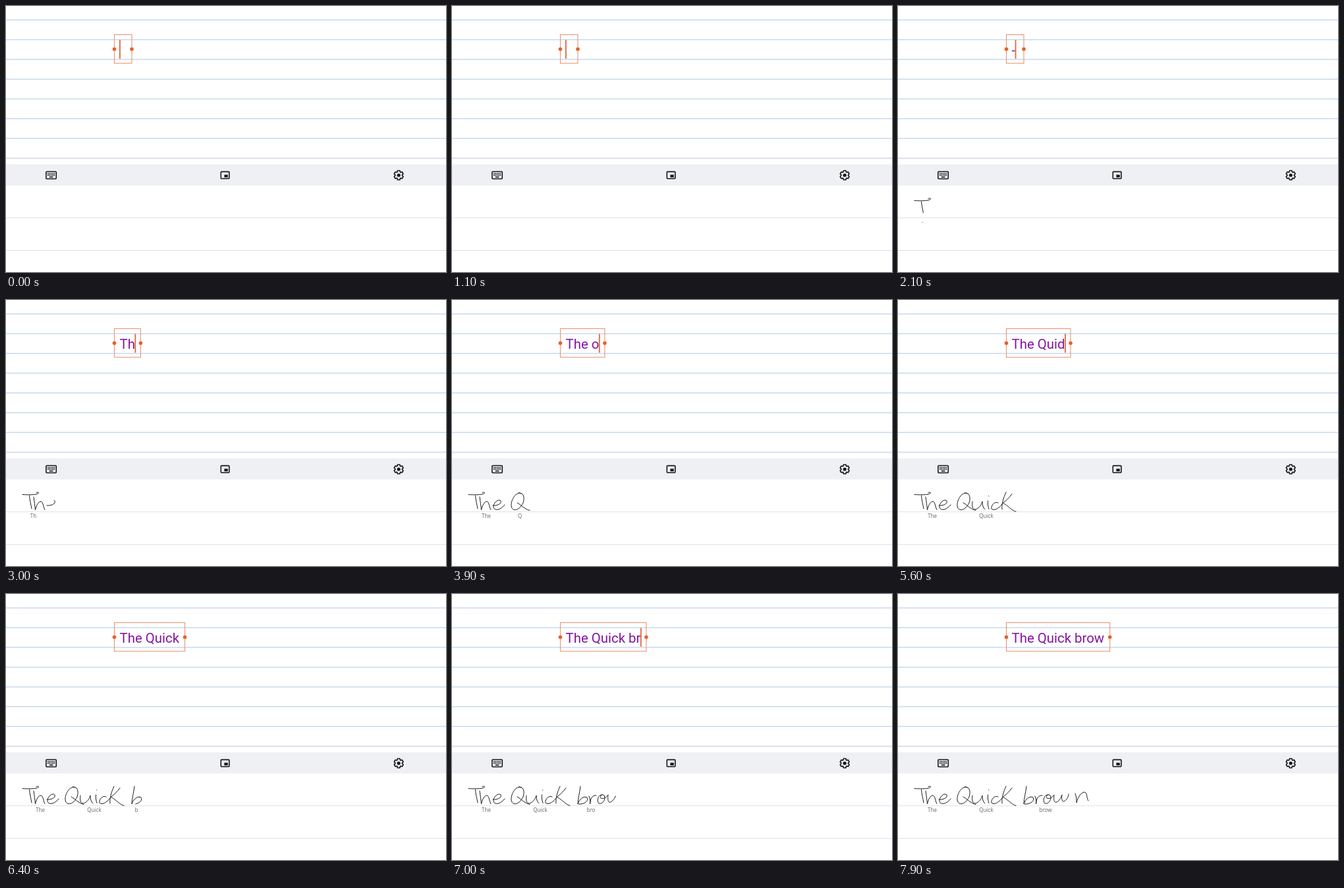
An HTML page for the animation above (8000 ms loop, 668 by 404 pixels).

```html
<!DOCTYPE html>
<html lang="en">
<head>
<meta charset="utf-8">
<title>Handwriting to text</title>
<style>
  html, body { margin: 0; width: 100%; height: 100%; overflow: hidden; background: #fff; }
  svg { display: block; width: 668px; height: 404px; }
  #typed { font: 20.4px Roboto, sans-serif; fill: #8515a0; }
  #labels text { font: 8px "Noto Sans", "Open Sans", sans-serif; fill: #6e6e6e; text-anchor: middle; }
  #ink path { fill: none; stroke: #1c1c1c; stroke-width: 1; stroke-linecap: round; stroke-linejoin: round; }
  #frame { fill: none; stroke: #ec9470; stroke-width: 1.1; }
  .knob { fill: #e4612d; }
  .icon { fill: none; stroke: #161616; stroke-width: 1.6; stroke-linejoin: round; }
  .solid { fill: #161616; }
</style>
</head>
<body>
<svg viewBox="0 0 668 404">
  <g id="rules"></g>
  <rect y="240.5" width="668" height="32" fill="#eff0f4"/>
  <rect class="icon" x="60.9" y="251.5" width="15.4" height="11" rx="1"/>
  <g id="keys" class="solid"></g>
  <rect class="icon" x="326.3" y="251.6" width="12.6" height="10.6" rx="1"/>
  <rect class="solid" x="331.4" y="256.3" width="5.4" height="4"/>
  <path id="gear" class="icon"/>
  <circle class="solid" cx="596.2" cy="257" r="2.6"/>
  <text id="typed" x="172.5" y="73.9"></text>
  <rect id="cursor" x="172" y="51.5" width="1.8" height="28.5" fill="#e2673d"/>
  <rect id="frame" x="164.5" y="43.5" height="43.5"/>
  <circle class="knob" cx="164.5" cy="65.5" r="2.8"/>
  <circle id="knob" class="knob" cy="65.5" r="2.8"/>
  <g id="ink"></g>
  <g id="labels"></g>
</svg>
<script>
const LOOP = 8000, LEFT = 172.5, BLINK = 500;
const $ = id => document.getElementById(id);

function add(parent, tag, attrs) {
  const el = document.createElementNS("http://www.w3.org/2000/svg", tag);
  for (const k in attrs) el.setAttribute(k, attrs[k]);
  return parent.appendChild(el);
}

// Ruled paper and toolbar icons
const rule = (y, h, fill) => add($("rules"), "rect", { y: y - h / 2, width: 668, height: h, fill });
for (let i = 0; i < 7; i++) rule(21.2 + i * 30, 1.6, "#cbdcf0");
rule(231.3, 1.8, "#d6dde8");
rule(321.6, 1.2, "#e3e6ea");
rule(371.4, 1.2, "#dfe5ec");

for (let r = 0; r < 2; r++)
  for (let c = 0; c < 5; c++)
    add($("keys"), "rect", { x: 63 + c * 2.4, y: 253.7 + r * 2.4, width: 1.6, height: 1.6 });
add($("keys"), "rect", { x: 65.8, y: 258.9, width: 5.6, height: 1.6 });

const gear = [];
for (let i = 0; i < 6; i++)
  for (const [r, a] of [[5.3, -26], [7.2, -14], [7.2, 14], [5.3, 26]]) {
    const t = (i * 60 + a) * Math.PI / 180;
    gear.push(`${596.2 + r * Math.sin(t)} ${257 - r * Math.cos(t)}`);
  }
$("gear").setAttribute("d", `M${gear.join("L")}Z`);

// Pen strokes: start, end, path
const strokes = [
  [1680, 1900, "M25 295.5C32 296 41 296 46 295C51 293.5 51 291.5 46 292.3"],
  [1950, 2130, "M35.5 297C36 304 38 311 39 317"],
  [2480, 2780, "M42 299C43 306 44 313 44.5 319C46 312 49 306 53 306C57 307 56 314 59 318.5"],
  [2900, 3220, "M62 312C69 313 76 309 74 305C70 301 62 309 63 315C65 321 74 319 80 311"],
  [3480, 3720, "M105 294C98 290 89 303 90 313C92 323 103 319 108 308C111 299 108 292 101 293"],
  [3740, 3860, "M99 308C105 311 110 318 118 319.5"],
  [4180, 4430, "M113 306C112 313 113 319 118 318C123 316 127 311 128 306C128 311 129 316 132 318"],
  [4440, 4560, "M136.5 305C136 309 136.5 313 138 317.5"],
  [4680, 4700, "M137.5 297.5L138 298"],
  [4780, 4980, "M152 308C147 305 141 312 142 317C145 321 153 317 158 310"],
  [4990, 5130, "M164 292C160 301 157 310 158 318"],
  [5260, 5480, "M173 294.5C169 300 164 305 159 308.5C165 310 171 319 179 321.5"],
  [6150, 6420, "M195 292C194 302 191 311 191 319C193 312 200 306 205 309C208 314 201 320 192 319"],
  [6440, 6600, "M208 307C210 311 210 315 209.5 319C210 311 213 305 219 306"],
  [6620, 6800, "M228 305C222 304 219 314 223 318C229 320 234 311 231 306C228 303 224 306 226 310C230 312 234 309 236 306"],
  [6820, 7200, "M237 305C236 312 237 318 241 316C246 313 248 308 249 305C248 311 249 316 252 315C256 313 259 308 259 304"],
  [7360, 7660, "M269 303C271 308 271 313 271 317C273 308 279 300 284 301C288 304 286 311 289 314"]
].map(([from, to, d]) => ({ from, to, el: add($("ink"), "path", { d, pathLength: 1 }) }));

// Recognised words under the ink: time, text, centre
const words = [
  [[1900, "-", 37], [2250, "T", 37], [2700, "Th", 41.5], [3200, "The", 52]],
  [[3650, "o", 100], [3850, "Q", 103], [4350, "Qu", 111.5], [4650, "Qui", 114], [5050, "Quid", 125], [5450, "Quick", 134]],
  [[6350, "b", 198], [6600, "br", 204], [6850, "bro", 211], [7350, "brow", 224]]
].map(steps => ({ steps, el: add($("labels"), "text", { y: 330.6 }) }));

// Typed text: time, text
const typed = [
  [-100, ""], [2000, "-"], [2400, "T"], [2800, "Th"], [3300, "The"], [3800, "The o"], [4050, "The Q"],
  [4400, "The Qu"], [4800, "The Qui"], [5200, "The Quid"], [5700, "The Quick"], [6450, "The Quick b"],
  [6750, "The Quick br"], [7100, "The Quick bro"], [7400, "The Quick brow"]
];

const stepAt = (steps, t) => steps.filter(s => s[0] <= t).pop();

function setText(el, s) {
  if (el.textContent !== s) el.textContent = s;
}

function draw(t) {
  for (const { from, to, el } of strokes) {
    const p = Math.min(1, Math.max(0, (t - from) / (to - from)));
    el.style.visibility = p > 0 ? "visible" : "hidden";
    el.style.strokeDasharray = p < 1 ? `${p} 2` : "none";
  }
  for (const { steps, el } of words) {
    const s = stepAt(steps, t);
    setText(el, s ? s[1] : "");
    if (s) el.setAttribute("x", s[2]);
  }
  const [since, text] = stepAt(typed, t);
  setText($("typed"), text);
  const w = text ? $("typed").getComputedTextLength() : 0;
  const right = LEFT + Math.max(18.5, w + 8.5);
  $("frame").setAttribute("width", right - 164.5);
  $("knob").setAttribute("cx", right);
  $("cursor").setAttribute("x", LEFT + w - 0.5);
  const on = Math.floor((t - since) / BLINK) % 2 === 0;
  $("cursor").style.visibility = on ? "visible" : "hidden";
}

const start = performance.now();
function tick(now) {
  draw(Math.max(0, now - start) % LOOP);
  requestAnimationFrame(tick);
}
draw(0);
requestAnimationFrame(tick);
</script>
</body>
</html>
```
